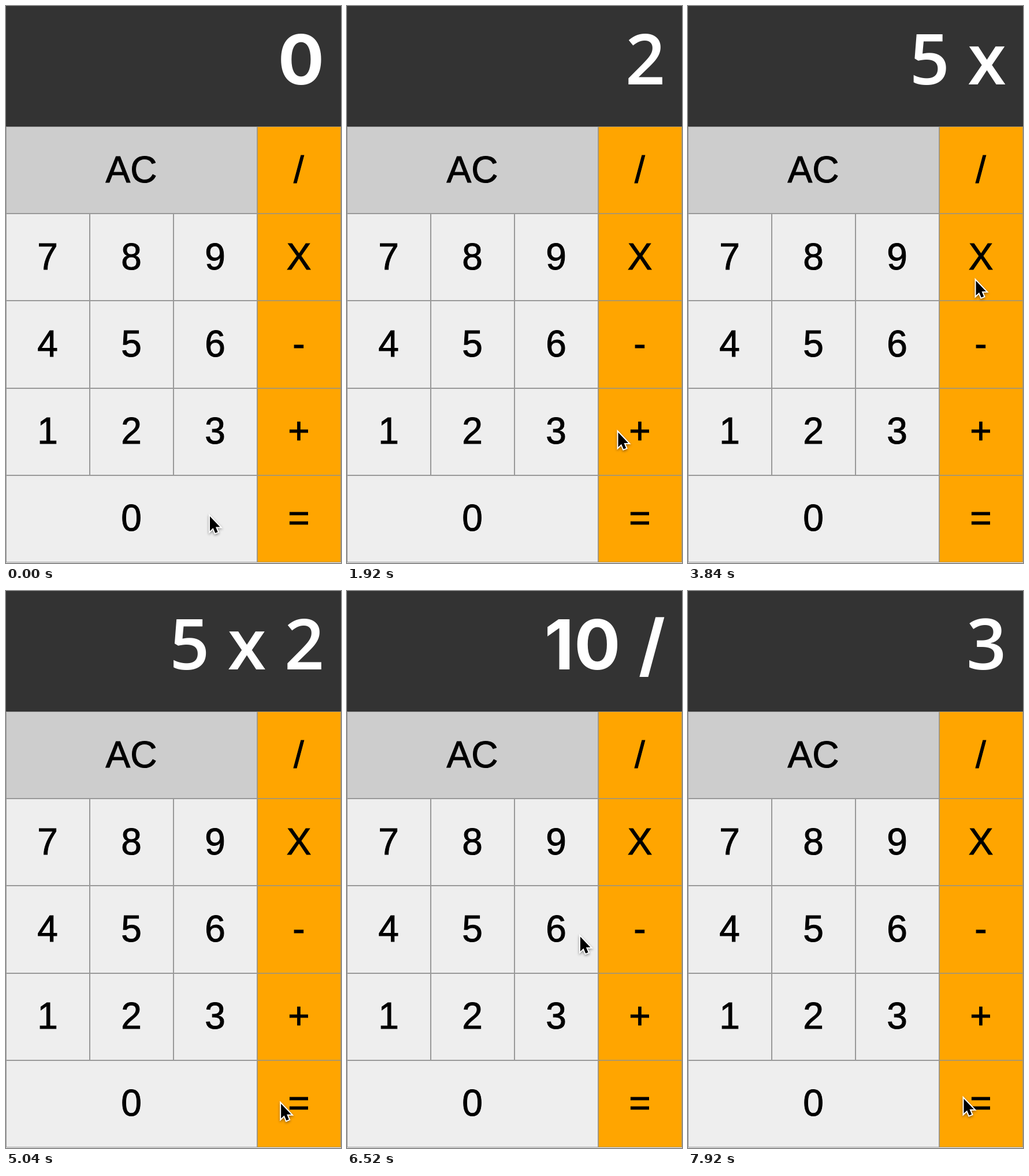
An HTML page with a canvas that plays this animation: 580 by 966 pixels, repeating every 8000 ms.

```html
<!DOCTYPE html>
<html lang="en">
<head>
<meta charset="utf-8">
<title>Calculator</title>
<style>
  html, body { margin: 0; width: 100%; height: 100%; overflow: hidden; background: #eee; }
  canvas { display: block; }
</style>
</head>
<body>
<canvas id="stage" width="580" height="966"></canvas>
<script>
const ctx = document.getElementById('stage').getContext('2d');
const LOOP = 8000, STEP = 40;
const COL = 145, TOP = 209, PITCH = 151.2;
const LAYOUT = ['AC /', '7 8 9 X', '4 5 6 -', '1 2 3 +', '0 ='];

const PAINT = {
  digit: ['#eeeeee', '#999999'],
  clear: ['#cdcdcd', '#999999'],
  op: ['#ffa500', '#ad9769']
};

const rowEdge = row => Math.round(TOP + PITCH * row);

// The first key of a two-key row spans three columns; the last key is an operator
const KEYS = LAYOUT.flatMap((line, row) => {
  const labels = line.split(' ');
  const wide = labels.length === 2;
  return labels.map((label, i) => {
    const last = i === labels.length - 1;
    const x = (last ? 3 : i) * COL, w = wide && !last ? 3 * COL : COL;
    const y = rowEdge(row), h = rowEdge(row + 1) - y;
    const kind = last ? 'op' : label === 'AC' ? 'clear' : 'digit';
    return { label, row, x, y, w, h, kind, cx: x + w / 2, cy: y + h / 2 };
  });
});

// key, press time, rest after the press, pointer offset from the key's centre
const PRESSES = [
  ['2', 1440, 200, 7, 21], ['+', 2080, 80, -38, 1], ['3', 2560, 0, 35, 14],
  ['=', 2920, 80, -13, -20], ['X', 3560, 320, -9, 41], ['2', 4480, 40, 7, 21],
  ['=', 5240, 240, -31, 0], ['/', 6360, 0, -8, 30], ['3', 6960, 30, -18, 38],
  ['=', 7880, 120, -30, -9]
];
const SETTLE = 180;

const OPS = {
  '+': (a, b) => a + b,
  '-': (a, b) => a - b,
  'x': (a, b) => a * b,
  '/': (a, b) => Math.floor(a / b)
};

function enter(text, key) {
  if (key === '=') {
    const [a, op, b] = text.split(' ');
    return String(OPS[op](+a, +b));
  }
  return text === '0' ? key : text + ' ' + key.toLowerCase();
}

function readout(t) {
  return PRESSES.filter(p => p[1] <= t).reduce((text, p) => enter(text, p[0]), '0');
}

const HUMANIST = '600 121px "Open Sans", "Noto Sans", sans-serif';
const GROTESK = 'bold 119px Inter, "Open Sans", sans-serif';

function drawReadout(t) {
  ctx.fillStyle = '#333';
  ctx.fillRect(0, 0, 580, TOP);
  ctx.fillStyle = '#fff';
  ctx.textAlign = 'right';
  let right = 551;
  for (const ch of [...readout(t)].reverse()) {
    ctx.font = '01/'.includes(ch) ? GROTESK : HUMANIST;
    ctx.fillText(ch, right, 136);
    right -= ctx.measureText(ch).width;
  }
}

function drawKey({ label, row, x, y, w, h, kind, cx }) {
  const [fill, border] = PAINT[kind];
  ctx.fillStyle = fill;
  ctx.fillRect(x, y, w, h);
  ctx.strokeStyle = border;
  ctx.lineWidth = 1;
  ctx.strokeRect(x + 0.5, y + 0.5, w - 1, h - 1);
  ctx.fillStyle = ctx.strokeStyle = '#000';
  ctx.font = '64px "Liberation Sans", Arial, sans-serif';
  ctx.textAlign = 'center';
  const baseline = 306 + 151.1 * row;
  ctx.fillText(label, cx - 0.5, baseline);
  ctx.strokeText(label, cx - 0.5, baseline);
}

const easeOut = u => u * (2 - u);

function pointer(t) {
  let x = 353, y = 885, leave = STEP;
  for (const [label, press, rest, dx, dy] of PRESSES) {
    if (t <= leave) break;
    const key = KEYS.find(k => k.label === label);
    const arrive = Math.max(press - SETTLE, leave + STEP);
    const u = easeOut(Math.min((t - leave) / (arrive - leave), 1));
    x += (key.cx + dx - x) * u;
    y += (key.cy + dy - y) * u;
    leave = press + rest;
  }
  return [x, y];
}

const ARROW = new Path2D('M0 0V25.5L5.6 20.2L9.3 29L13.7 27.2L10 18.5H17.5Z');

function drawPointer(t) {
  ctx.save();
  ctx.translate(...pointer(t));
  ctx.lineWidth = 4;
  ctx.miterLimit = 3;
  ctx.strokeStyle = '#fff';
  ctx.shadowColor = 'rgba(0,0,0,0.4)';
  ctx.shadowBlur = 4;
  ctx.shadowOffsetY = 2;
  ctx.stroke(ARROW);
  ctx.shadowColor = 'transparent';
  ctx.fillStyle = '#000';
  ctx.fill(ARROW);
  ctx.restore();
}

const start = performance.now();

function frame() {
  const t = Math.floor((performance.now() - start) % LOOP / STEP) * STEP;
  ctx.fillStyle = '#eee';
  ctx.fillRect(0, 0, 580, 966);
  drawReadout(t);
  KEYS.forEach(drawKey);
  drawPointer(t);
  requestAnimationFrame(frame);
}
frame();
</script>
</body>
</html>
```
